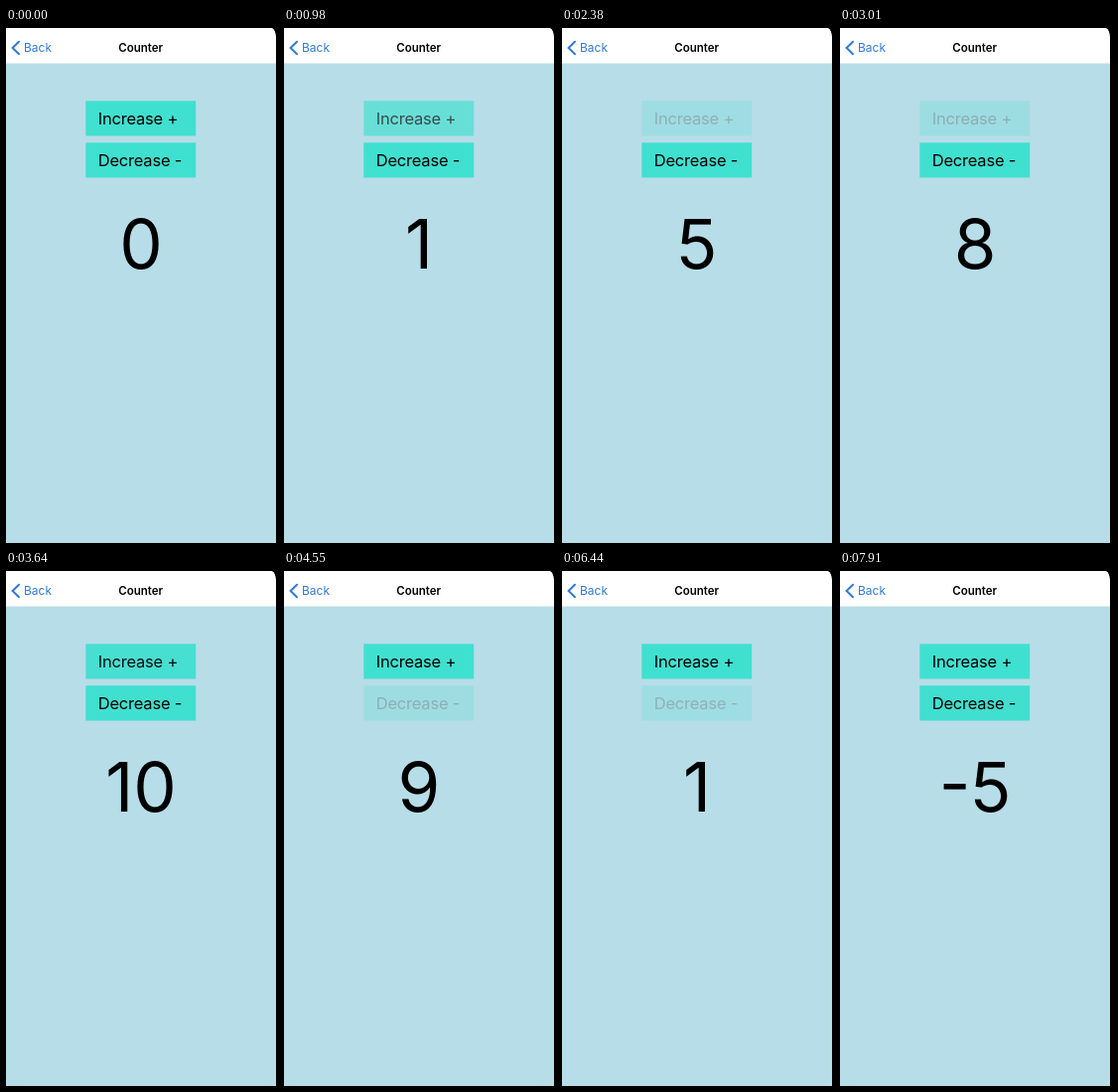
Write an HTML page that moves like this. It is 274 px wide and 518 px high and loops after 8000 ms.

```html
<!DOCTYPE html>
<html lang="en">
<head>
<meta charset="utf-8">
<title>Counter</title>
<style>
  html, body { margin: 0; width: 100%; height: 100%; overflow: hidden; background: #000; }
  svg { display: block; width: 274px; height: 518px; font-family: Inter, Roboto, sans-serif; }
  .label { font-size: 16.5px; letter-spacing: -.2px; }
  .blue { fill: #2f7ad6; }
</style>
</head>
<body>
<svg viewBox="0 0 274 518">
  <rect y="35" width="272" height="483" fill="#b7dde8"/>
  <path d="M0 0H268Q271.5 2 272 9V35.5H0Z" fill="#fff"/>
  <path d="M13 13.8 6.6 20 13 26.2" fill="none" stroke="#2f7ad6" stroke-width="2" stroke-linecap="round"/>
  <text class="blue" x="18" y="24.2" font-size="12">Back</text>
  <text x="135.7" y="24.2" font-size="11.5" font-weight="600" text-anchor="middle">Counter</text>
  <g id="increase">
    <rect x="80.3" y="73.3" width="110.9" height="35.2" fill="#40e0d0"/>
    <text class="label" x="92.7" y="97.4">Increase +</text>
  </g>
  <g id="decrease">
    <rect x="80.3" y="115.3" width="110.9" height="35.2" fill="#40e0d0"/>
    <text class="label" x="92.7" y="139.4">Decrease -</text>
  </g>
  <text id="count" x="136" y="242" font-size="69" text-anchor="middle">0</text>
</svg>
<script>
const LOOP = 8000, STEP = 70, LAST = 7910;
const HOLD = 135, FADE_OUT = 150, FADE_IN = 250, DIM = 0.2;

// Each tap: release time in ms, optional press length in ms.
const increases = [[845], [1180], [1510], [1830], [2130], [2480, 240],
  [2770, 225], [2990], [3215], [3440]];
const decreases = [[4380, 265], [4675, 235], [4870], [5070], [5325, 130],
  [5650, 270], [5850], [6040], [6215], [6560, 265],
  [6785], [7010], [7235], [7460], [7680]];

const clamp = x => Math.min(1, Math.max(0, x));
const ease = x => x < 0.5 ? 2 * x * x : 1 - 2 * (1 - x) ** 2;
const fade = (from, to, elapsed, duration) =>
  from + (to - from) * ease(clamp(elapsed / duration));

// A fade starts from whatever opacity the interrupted one had reached.
function opacityAt(taps, time) {
  let from = 1, to = 1, start = 0, duration = FADE_IN;
  const at = t => fade(from, to, t - start, duration);
  for (const [release, hold = HOLD] of taps) {
    for (const [when, target, length] of
         [[release - hold, DIM, FADE_OUT], [release, 1, FADE_IN]]) {
      if (when > time) return at(time);
      [from, to, start, duration] = [at(when), target, when, length];
    }
  }
  return at(time);
}

const released = (taps, time) => taps.filter(([release]) => release <= time).length;
const [increase, decrease, count] =
  ['increase', 'decrease', 'count'].map(id => document.getElementById(id));

function draw(now) {
  const time = Math.min(LAST, Math.floor((now % LOOP) / STEP) * STEP);
  increase.setAttribute('opacity', opacityAt(increases, time));
  decrease.setAttribute('opacity', opacityAt(decreases, time));
  count.textContent = released(increases, time) - released(decreases, time);
}

const origin = performance.now();
function tick() {
  draw(performance.now() - origin);
  requestAnimationFrame(tick);
}
tick();
</script>
</body>
</html>
```
